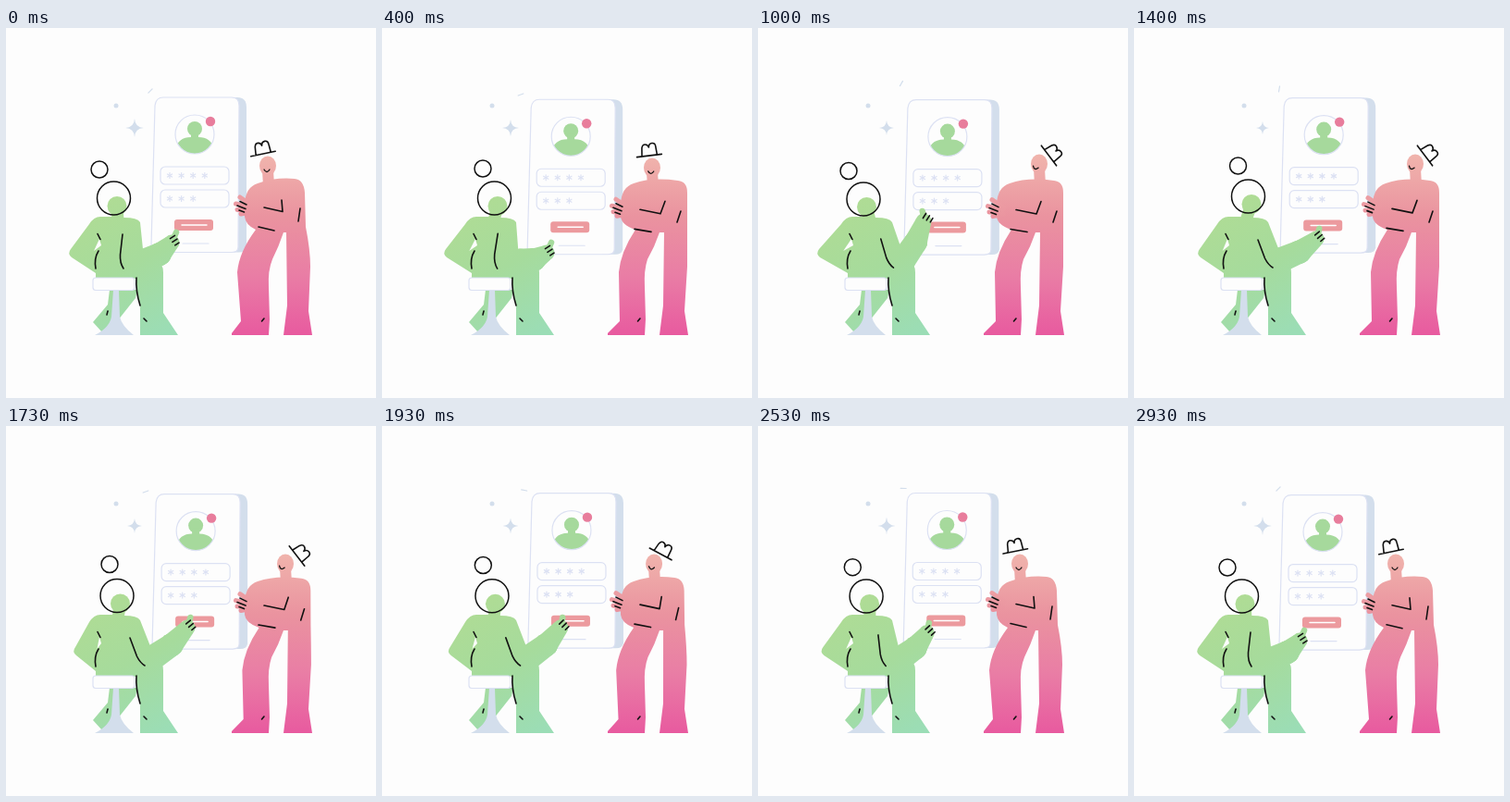
Animation of 400x400 px, one loop 2.99 s. Source, as an HTML page with a canvas:

```html
<!DOCTYPE html>
<html lang="en">
<head>
<meta charset="utf-8">
<title>Sign-in teamwork</title>
<style>
html, body { margin: 0; width: 100%; height: 100%; overflow: hidden; background: #fdfdfd }
canvas { display: block; width: 100vw; height: 100vh }
</style>
</head>
<body>
<canvas id="stage" width="400" height="400"></canvas>
<script>
const ctx = document.getElementById('stage').getContext('2d');
const LOOP = 2990, STEPS = 45;
const PAPER = '#fdfdfd', INK = '#111', EDGE = '#dce1f3', SIDE = '#d3deec';
const times = [0, 400, 1000, 1400, 1730, 2200, 2930];

// One value per key time; the last pose repeats the first.
const keys = {
  hairX: [116.5, 121.5, 114, 123.5, 120, 118],
  hairY: [184, 184, 185, 182, 183.5, 184],
  bunX: [101, 109, 98, 112.5, 112, 104.5],
  bunY: [153, 152, 154.5, 149, 149.5, 152],
  elbow: [68, 67, 64, 69, 73, 69],
  bend: [0, -.1, .85, 1, 1, .9],
  handX: [180, 179, 180, 198, 197, 188],
  handY: [226, 237, 203, 222, 212, 212],
  handTurn: [-33, -33, -58, -40, -40, -50],
  lean: [0, 1, 1, 1, .9, 0],
  headX: [283, 292, 304, 304, 302, 283],
  headY: [149, 151, 147, 147, 149, 149],
  hatX: [278, 289, 314.5, 314.5, 314.5, 279],
  hatY: [136, 138, 138, 138, 140.5, 135],
  hatTurn: [-12, -7, 53, 53, 52, -10],
  tickX: [156, 150, 155, 157, 151, 158],
  tickY: [68, 72, 60, 66, 71, 67],
  tickTurn: [-45, -20, -60, -80, -20, 35],
  spark: [10, 9, 8, 7, 8, 9]
};

// Smooth curve through the keys that rests at each extreme.
function sample(list, t) {
  const n = times.length, v = [...list, list[0]];
  const at = i => times[(i + n) % n] + Math.floor(i / n) * LOOP;
  const val = i => v[(i + n) % n];
  const rise = i => (val(i + 1) - val(i)) / (at(i + 1) - at(i));
  const slope = i => {
    const a = rise(i - 1), b = rise(i);
    return a * b <= 0 ? 0 : 2 * a * b / (a + b);
  };
  let i = 0;
  while (i < n - 1 && t >= at(i + 1)) i++;
  const h = at(i + 1) - at(i), u = (t - at(i)) / h, w = 1 - u;
  return w * w * (1 + 2 * u) * val(i) + u * u * (3 - 2 * u) * val(i + 1)
    + h * u * w * (w * slope(i) - u * slope(i + 1));
}

function gradient(x0, y0, x1, y1, ...colors) {
  const g = ctx.createLinearGradient(x0, y0, x1, y1);
  colors.forEach((c, i) => g.addColorStop(i / (colors.length - 1), c));
  return g;
}
const GREEN = gradient(85, 190, 165, 335, '#b0dc94', '#a6db9c', '#9bddb6');
const PINK = gradient(0, 140, 0, 332, '#f0b3ac', '#ea939f', '#e97da5', '#e85a9f');

function fill(d, color) {
  ctx.fillStyle = color;
  ctx.fill(new Path2D(d));
}
function line(d, color = INK, width = 1.6) {
  ctx.strokeStyle = color;
  ctx.lineWidth = width;
  ctx.stroke(new Path2D(d));
}
function disc(x, y, r, color, ry = r) {
  ctx.beginPath();
  ctx.ellipse(x, y, r, ry, 0, 0, 7);
  ctx.fillStyle = color;
  ctx.fill();
}
function ring(x, y, r, color = INK, width = 1.5) {
  ctx.beginPath();
  ctx.arc(x, y, r, 0, 7);
  ctx.strokeStyle = color;
  ctx.lineWidth = width;
  ctx.stroke();
}
function box(x, y, w, h, r, color, edge) {
  ctx.beginPath();
  ctx.roundRect(x, y, w, h, r);
  ctx.fillStyle = color;
  ctx.fill();
  if (edge) {
    ctx.strokeStyle = edge;
    ctx.lineWidth = 1.2;
    ctx.stroke();
  }
}
function placed(x, y, degrees, draw) {
  ctx.save();
  ctx.translate(x, y);
  ctx.rotate(degrees * Math.PI / 180);
  draw();
  ctx.restore();
}
function limb(x1, y1, r1, x2, y2, r2, color) {
  const a = Math.atan2(y2 - y1, x2 - x1) + Math.PI / 2;
  const c = Math.cos(a), s = Math.sin(a);
  disc(x1, y1, r1, color);
  disc(x2, y2, r2, color);
  fill(`M${x1 + r1 * c} ${y1 + r1 * s}L${x2 + r2 * c} ${y2 + r2 * s}
    L${x2 - r2 * c} ${y2 - r2 * s}L${x1 - r1 * c} ${y1 - r1 * s}Z`, color);
}

function drawSparkles(p) {
  const r = p.spark;
  placed(139, 108, 0, () =>
    fill(`M0 ${-r}Q.5 -.5 ${r} 0Q.5 .5 0 ${r}Q-.5 .5 ${-r} 0Q-.5 -.5 0 ${-r}`, SIDE));
  disc(119, 84, 2.5, SIDE);
  placed(p.tickX, p.tickY, p.tickTurn, () => line('M-3 0H3', SIDE, 1.2));
}

function drawPhone(dx, dy) {
  placed(dx, dy, 0, () => {
    fill('M240 75H250Q260 75 260 86V237Q259 242.500 252 242.500H238Z', SIDE);
    const front = 'M170 75H244Q252 75 252 84L251 237Q251 242.500 244 242.500H163Q157 242.500 157 236L161 84Q162 75 170 75Z';
    fill(front, PAPER);
    line(front, EDGE, 1.2);

    disc(204, 115, 21, PAPER);
    ctx.save();
    ctx.beginPath();
    ctx.arc(204, 115, 21, 0, 7);
    ctx.clip();
    disc(204, 109, 8, '#a6d99c');
    fill('M200 112H208V118Q225 118 226 138H182Q183 118 200 118Z', '#a6d99c');
    ctx.restore();
    ring(204, 115, 21, EDGE, 1.2);
    disc(221, 101, 5.2, '#e87d9c');

    [[150, 4], [175, 3]].forEach(([y, count]) => {
      box(167, y, 74, 19, 5, PAPER, EDGE);
      for (let i = 0; i < count; i++)
        for (let a = 30; a < 200; a += 60)
          placed(177 + 12.6 * i, y + 9.5, a, () => line('M-3 0H3', EDGE, 1.2));
    });

    box(182, 207, 42, 12, 3, '#ec9a9e');
    line('M190 213H217', '#fff', 1.5);
    line('M191 233H219', EDGE, 1.2);
  });
}

function drawHelper(p, dy) {
  const s = p.lean, x = p.headX, y = p.headY;
  line(`M${x} ${y + 5}L${x + 1} 170`, PINK, 12);
  disc(x, y, 9, PINK, 10.5);
  fill(`M258 190Q259 172 272 168Q292 161 ${312 + 8 * s} ${163 + 2 * s}
    Q${322 + 8 * s} ${164 + 2 * s} ${323 + 7 * s} 178L${324 + 6 * s} 215
    Q${329 + s} 240 ${329 + s} 258L327 306L331 332H300L304 300L${303 + 2 * s} 221H300
    Q295 236 ${288 - s} 250Q283 262 284 280L285 315L284 332H244V330L${254 + 3 * s} 317
    L${250 + 6 * s} 264Q${252 + 6 * s} 242 ${270 + 4 * s} 218Q259 213 258 204Z`, PINK);

  placed(0, dy, 0, () => {
    line('M266 192L253 183M264 194L248.500 190M260 196L250 196.500M265 199L254 201', PINK, 5);
    line('M253 187.500L260 191M250 192L259 195.500M252 197L257.500 199');
  });
  placed(0, dy * .6, 0, () => {
    line(`M279 ${194 + s}L${299 + 2 * s} ${198.5 + s}L${298 + 8 * s} 186`);
    line(`M273 ${215 + s}L${290 + s} 219`);
  });
  line(`M${318 + 5 * s} ${195 + 3 * s}L${316 + 3 * s} ${209 + s}`);
  line('M276.500 317L279 314');

  const tilt = (p.hatTurn + 12) / 65;
  placed(x - 1 - 3 * tilt, y + 5 - tilt, 20 * tilt, () => line('M-3 -1Q0 4 3 -1', INK, 1.3));
  placed(p.hatX, p.hatY, p.hatTurn, () =>
    line('M-13.500 0H13.500M-8 0L-7 -9Q-6 -13 -3 -12.500Q0 -12 .5 -9Q1 -13 4.500 -13Q8 -13 8 -9L8.500 0'));
}

function drawForearm(ax, ay, hx, hy) {
  const dx = hx - ax, dy = hy - ay, bulge = 3 / Math.hypot(dx, dy);
  const mx = ax + dx / 2 - dy * bulge, my = ay + dy / 2 + dx * bulge;
  limb(ax, ay, 13.5, mx, my, 12.5, GREEN);
  limb(mx, my, 12.5, hx, hy, 8.5, GREEN);
}

function drawSitter(p) {
  const b = p.bend, ex = p.elbow, ax = 150 + 8 * b, ay = 252 - b;
  const hx = p.handX, hy = p.handY, faceX = p.hairX + 3.5, faceY = p.hairY + 8.5;

  // Far leg, stool, near leg
  fill('M112 283H142L140 292L121 316L104 329L94 318L110 299Z', GREEN);
  fill('M116 283H122L123 312Q125 322 138 332H96Q112 324 114 312Z', SIDE);
  line('M110 306L109 310');
  fill('M128 255H160Q170 252 170 264V308L186 332H145V300L141 280V270H128Z', GREEN);

  line(`M${faceX} ${faceY}L121 208`, GREEN, 13);
  disc(faceX, faceY, 10.5, GREEN);
  fill(`M114 204H102Q95 204 90 212L${ex + 2} 239Q${ex - 2} 244 ${ex + 3} 248L97 265V271H142L155 262
    L${ax - 2} ${ay - 13}L145 210Q142 205 128 205Z`, GREEN);
  drawForearm(ax, ay, hx - 1, hy + 6);
  line(`M${hx} ${hy + 4}L${hx + 4 + (p.handTurn + 33) * .25} ${hy - 5}`, GREEN, 6.5);
  placed(hx, hy, p.handTurn, () => line('M-3 0H3M-3 4.500H3M-2.500 9H2.500'));

  fill(`M101 228L103 235L${95 + (ex - 68) * .7} 241Z`, PAPER);
  line('M99 222.500L102 228.500');
  line('M100 241Q95 249 97 260');
  line(`M${126 + 8 * b} ${223 + 6 * b}L${123.5 + 18 * b} ${245 + 4 * b}
    Q${123 + 22 * b} ${254 + 2 * b} ${127 + 23 * b} ${260 - b}`);
  line('M141 270Q140 284 145 300');
  line('M149 314L152 317');
  box(94, 270, 45, 13.5, 3, PAPER, EDGE);

  ring(p.hairX, p.hairY, 18);
  ring(p.bunX, p.bunY, 9);
}

function render(now) {
  const t = Math.floor(now % LOOP * STEPS / LOOP) * LOOP / STEPS;
  const p = {}, turn = t / LOOP * 2 * Math.PI;
  for (const name in keys) p[name] = sample(keys[name], t);
  const dx = .6 - .6 * Math.cos(turn), dy = 3 * Math.sin(turn);

  ctx.fillStyle = PAPER;
  ctx.fillRect(0, 0, 400, 400);
  drawSparkles(p);
  drawPhone(dx, dy);
  drawHelper(p, dy);
  drawSitter(p);
}

ctx.lineCap = ctx.lineJoin = 'round';
const start = performance.now();
function tick() {
  render(performance.now() - start);
  requestAnimationFrame(tick);
}
tick();
</script>
</body>
</html>
```
